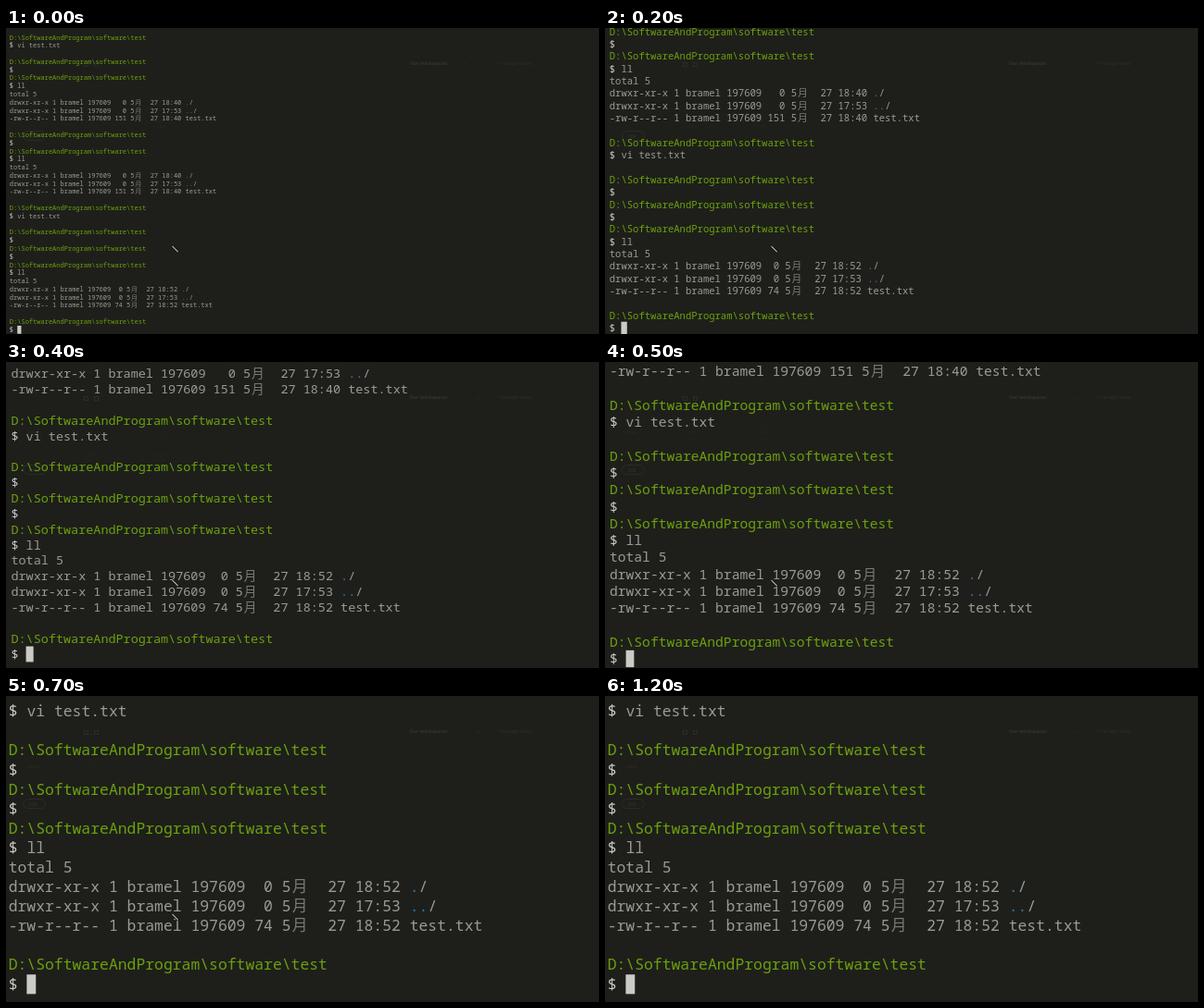
Recreate the animation shown at these times as an HTML page with a canvas. Size 640 px wide and 331 px high, loop 1.3 s.

```html
<!DOCTYPE html>
<html lang="en">
<head>
<meta charset="utf-8">
<title>Terminal zoom</title>
<style>
html, body { margin: 0; width: 100%; height: 100%; overflow: hidden; background: #1e1f1a; }
canvas { display: block; }
</style>
</head>
<body>
<canvas id="stage" width="640" height="331"></canvas>
<script>
const ctx = document.getElementById('stage').getContext('2d');
const W = 640, H = 331, STEP = 100, STEPS = 13;
const MONO = '"Noto Sans Mono", "DejaVu Sans Mono", monospace';
const CJK = '"Noto Sans CJK SC", "Noto Sans CJK JP", "Noto Sans CJK", sans-serif';
const GREEN = '#6ca00f', GREY = '#9a9b95', WHITE = '#cbcbc6', BLUE = '#2b7cbc';

const PATH = 'D:\\SoftwareAndProgram\\software\\test';
const prompt = (cmd = '') => [PATH, '$ ' + cmd];
const listing = (size, time) => {
  const row = (mode, n, clock, name) =>
    `${mode} 1 bramel 197609 ${String(n).padStart(String(size).length)} 5月  27 ${clock} ${name}`;
  return [...prompt('ll'), 'total 5',
    row('drwxr-xr-x', 0, time, './'),
    row('drwxr-xr-x', 0, '17:53', '../'),
    row('-rw-r--r--', size, time, 'test.txt'), ''];
};
const LINES = [
  ...prompt('vi test.txt'), '', ...prompt(), ...listing(151, '18:40'),
  ...prompt(), ...listing(151, '18:40'),
  ...prompt('vi test.txt'), '', ...prompt(), ...prompt(), ...listing(74, '18:52'),
  ...prompt()
];

// Cell size in screen pixels, left edge and centre of the last line, per zoom level
const SCALE = 0.3515;
const ZOOM = [
  [12, 25, 3.8, 326.4], [15, 32, 4, 323.5], [18, 38, 4.8, 324.4], [18, 38, 3.2, 329.8],
  [23, 48, 5.4, 316], [25, 52, 5, 321], [26, 55, 4.9, 320], [28, 60, 2.7, 311.8]
];
const POINTER = { 8: [318, 271], 9: [447, 303], 10: [524, 316], 11: [586, 326] };

function put(text, x, y, color, font) {
  ctx.font = font;
  ctx.fillStyle = color;
  ctx.fillText(text, x, y);
}

function drawBackdrop() {
  ctx.fillStyle = '#1e1f1a';
  ctx.fillRect(0, 0, W, H);
  const faint = '#2b2c27', tiny = '5px "Open Sans", sans-serif';
  put('Our workspaces', 436, 40, '#34352f', 'bold ' + tiny);
  put('+', 494, 40, faint, tiny);
  put('a', 508, 40, faint, tiny);
  put('+ manage items', 530, 40, '#30312b', tiny);
  ctx.strokeStyle = faint;
  ctx.lineWidth = 1;
  for (const x of [84, 95]) ctx.strokeRect(x + 0.5, 37.5, 4, 4);
  ctx.beginPath();
  ctx.roundRect(18.5, 111.5, 24, 10, 5);
  ctx.stroke();
  put('Edit', 25, 119, '#34352f', tiny);
  put('notes', 22, 78, faint, tiny);
  for (const x of [86, 160]) {
    for (let y = 64; y < 90; y += 7) put('sample', x, y, '#20261b', tiny);
    put('page', x, 102, '#252621', tiny);
    put('notes', x, 108, '#252621', tiny);
  }
}

function drawLine(line, x, y, cw) {
  const size = cw / 0.6, font = `${size}px ${MONO}`, base = y + size * 0.35;
  const at = (col, text, color) => put(text, x + col * cw, base, color, font);
  if (line === PATH) return at(0, line, GREEN);
  if (line[0] === '$') {
    at(0, '$', WHITE);
    return at(2, line.slice(2), GREY);
  }
  const [head, tail] = line.split('月');
  at(0, head, GREY);
  if (!tail) return;
  const col = head.length;
  put('月', x + (col + 0.1) * cw, base, '#7d7970', `300 ${cw * 1.7}px ${CJK}`);
  const dots = tail.match(/ (\.+)\/$/);
  if (!dots) return at(col + 2, tail, GREY);
  const start = tail.length - dots[1].length - 1;
  at(col + 2, tail.slice(0, start), GREY);
  at(col + 2 + start, dots[1], BLUE);
  at(col + 1 + tail.length, '/', GREY);
}

function drawTerminal([cell, pitch, x, last]) {
  const cw = cell * SCALE, lh = pitch * SCALE;
  LINES.forEach((line, i) => {
    const y = last - (LINES.length - 1 - i) * lh;
    if (y > 2) drawLine(line, x, y, cw);
  });
  ctx.fillStyle = WHITE;
  ctx.fillRect(x + 2 * cw, last - lh / 2, cw, lh);
}

function drawPointer([x, y]) {
  const stroke = (color, width, from, to) => {
    ctx.strokeStyle = color;
    ctx.lineWidth = width;
    ctx.beginPath();
    ctx.moveTo(x + from, y + from);
    ctx.lineTo(x + to, y + to);
    ctx.stroke();
  };
  stroke('#0c0d0a', 3, 0, 6.5);
  stroke('#a9a9a5', 1.3, 0, 6.2);
}

function frame() {
  const step = Math.floor(performance.now() / STEP) % STEPS;
  drawBackdrop();
  drawTerminal(ZOOM[Math.min(step, ZOOM.length - 1)]);
  if (step < 12) drawPointer(POINTER[step] || [179.5, 236]);
  requestAnimationFrame(frame);
}
frame();
</script>
</body>
</html>
```
